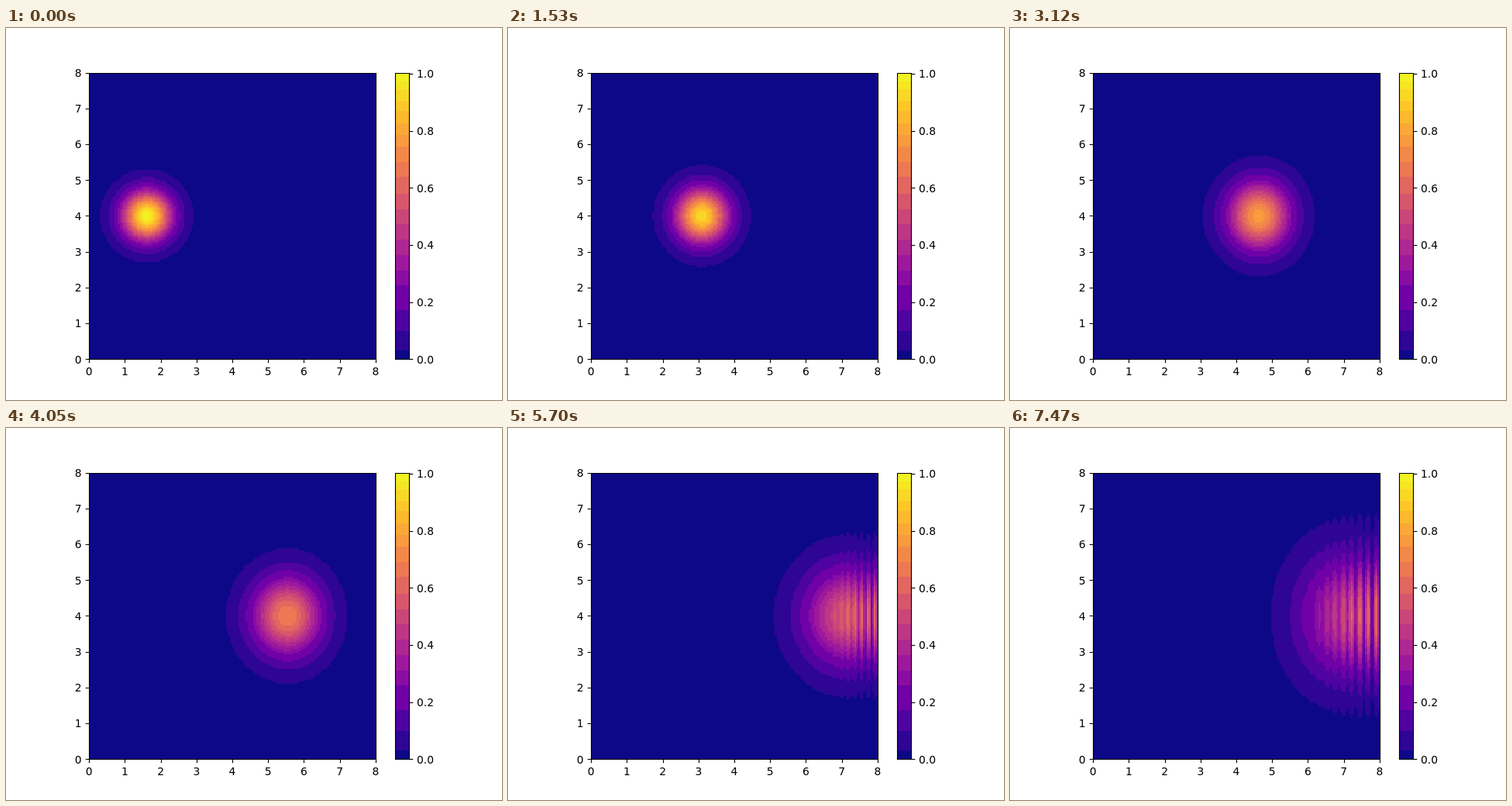
Animation, 640 px wide and 480 px high, one loop 7500 ms. Source, as an HTML page with a canvas:

```html
<!DOCTYPE html>
<html lang="en">
<head>
<meta charset="utf-8">
<title>Wave packet</title>
<style>
  html, body { margin: 0; width: 100%; height: 100%; overflow: hidden; background: #fff; }
  canvas, svg { position: absolute; left: 0; top: 0; }
  text { font: 13.89px "DejaVu Sans", sans-serif; fill: #000; }
</style>
</head>
<body>
<canvas id="field" width="640" height="480"></canvas>
<svg id="axes" width="640" height="480" viewBox="0 0 640 480"></svg>
<script>
const FRAME_MS = 30, FRAMES = 250, STEPS_PER_FRAME = 2;
const LEFT = 107.2, TOP = 57.6, SIDE = 369.6, BOTTOM = TOP + SIDE;
const MAX_VALUE = 1.0043;

// Plasma colours, reduced to flat bands
const STOPS = ['0d0887', '46039f', '7201a8', '9c179e', 'bd3786',
               'd8576b', 'ed7953', 'fb9f3a', 'fdca26', 'f0f921']
  .map(hex => [0, 2, 4].map(i => parseInt(hex.slice(i, i + 2), 16)));
const EDGES = [0, 8, 25, 44, 66, 79, 93, 107, 121, 134, 148, 163, 176, 190, 200, 211, 222, 231, 241, 248, 256];

function plasma(u) {
  const s = u * (STOPS.length - 1), i = Math.min(Math.floor(s), STOPS.length - 2);
  return STOPS[i].map((a, c) => Math.round(a + (STOPS[i + 1][c] - a) * (s - i)));
}
const bands = EDGES.slice(0, -1).map((lo, i) => ({
  lo, hi: EDGES[i + 1], rgb: plasma(i ? (lo + EDGES[i + 1]) / 512 : 0)
}));
const palette = bands.flatMap(b => Array(b.hi - b.lo).fill((255 << 24 | b.rgb[2] << 16 | b.rgb[1] << 8 | b.rgb[0]) >>> 0));

// Schrödinger packet in a box: sine modes with the Crank–Nicolson phase per step
const N = 159, MID = (N - 1) / 2, LENGTH = 8, SIGMA = 0.5, WAVE = 15 * Math.PI;

function sineModes(center, k) {
  const modes = [];
  for (let m = 1; m <= N; m++) {
    const shape = Float64Array.from({ length: N }, (_, j) => Math.sin(Math.PI * m * (j + 1) / (N + 1)));
    let re = 0, im = 0;
    for (let j = 0; j < N; j++) {
      const d = LENGTH * j / (N - 1) - center;
      const g = Math.exp(-d * d / (2 * SIGMA * SIGMA)) * shape[j] * 2 / (N + 1);
      re += g * Math.cos(k * d);
      im += g * Math.sin(k * d);
    }
    if (Math.hypot(re, im) > 1e-5) modes.push({ re, im, shape, energy: (1 - Math.cos(Math.PI * m / (N + 1))) / 4 });
  }
  return modes;
}
const xModes = sineModes(LENGTH / 5, WAVE);
const yModes = sineModes(LENGTH / 2, 0);
const turns = xModes.map(mx => yModes.map(my => -2 * Math.atan(mx.energy + my.energy)));
const levels = new Uint8Array(N * N);

function solve(step) {
  const coefs = xModes.map((mx, a) => yModes.map((my, b) => {
    const c = Math.cos(turns[a][b] * step), s = Math.sin(turns[a][b] * step);
    return [(mx.re * c - mx.im * s) * my.re, (mx.re * s + mx.im * c) * my.re];
  }));
  const re = new Float64Array(N), im = new Float64Array(N);
  for (let row = 0; row <= MID; row++) {
    re.fill(0);
    im.fill(0);
    xModes.forEach((mx, a) => {
      let gr = 0, gi = 0;
      for (let b = 0; b < yModes.length; b++) {
        const y = yModes[b].shape[row];
        gr += coefs[a][b][0] * y;
        gi += coefs[a][b][1] * y;
      }
      for (let j = 0; j < N; j++) {
        re[j] += gr * mx.shape[j];
        im[j] += gi * mx.shape[j];
      }
    });
    for (let j = 0; j < N; j++) {
      const v = Math.sqrt(re[j] * re[j] + im[j] * im[j]) / MAX_VALUE;
      const level = Math.min(255, Math.floor(v * 256));
      levels[row * N + j] = levels[(N - 1 - row) * N + j] = level;
    }
  }
}

const PX = 370, X0 = 107, Y0 = 58;
const ctx = document.getElementById('field').getContext('2d');
const picture = ctx.createImageData(PX, PX);
const pixels = new Uint32Array(picture.data.buffer);
const cellsFrom = offset => Array.from({ length: PX }, (_, p) =>
  Math.max(0, Math.min(N - 1, Math.floor((p + 0.5 + offset) / SIDE * N))));
const columns = cellsFrom(X0 - LEFT), rows = cellsFrom(Y0 - TOP);

function drawField(frame) {
  solve(frame * STEPS_PER_FRAME);
  for (let y = 0; y < PX; y++)
    for (let x = 0; x < PX; x++)
      pixels[y * PX + x] = palette[levels[rows[y] * N + columns[x]]];
  ctx.putImageData(picture, X0, Y0);
}

// Axes and colour bar
const svg = document.getElementById('axes');
function add(tag, attrs, content = '') {
  const el = document.createElementNS('http://www.w3.org/2000/svg', tag);
  for (const key in attrs) el.setAttribute(key, attrs[key]);
  el.textContent = content;
  svg.appendChild(el);
}
const snap = v => Math.floor(v + 0.5) + 0.5;
const line = d => add('path', { d, fill: 'none', stroke: '#000', 'stroke-width': 1.11 });
const label = (x, y, anchor, s) => add('text', { x, y, 'text-anchor': anchor }, s);
const baseline = y => Math.round(y + 5.3);

for (const b of bands) {
  const y = Math.max(58, Math.round(BOTTOM - b.hi / 256 * SIDE));
  const end = Math.round(BOTTOM - b.lo / 256 * SIDE);
  add('rect', { x: 502, y, width: 18.5, height: end - y, fill: `rgb(${b.rgb})` });
}
line('M107.5 58.5H477.5V427.5H107.5Z');
line('M502.5 58.5H520.5V427.5H502.5Z');
for (let i = 0; i <= 8; i++) {
  const x = LEFT + i * SIDE / 8, y = BOTTOM - i * SIDE / 8;
  line(`M${snap(x)} 427.5v4.86M107.5 ${snap(y)}h-4.86`);
  label(x, 448, 'middle', i);
  label(97.5, baseline(y), 'end', i);
}
for (let i = 0; i <= 5; i++) {
  const y = BOTTOM - i / 5 / MAX_VALUE * SIDE;
  line(`M520.5 ${snap(y)}h4.86`);
  label(530, baseline(y), 'start', (i / 5).toFixed(1));
}

let shown = -1;
const start = performance.now();
function tick() {
  const frame = Math.floor((performance.now() - start) / FRAME_MS) % FRAMES;
  if (frame !== shown) drawField(shown = frame);
  requestAnimationFrame(tick);
}
tick();
</script>
</body>
</html>
```
